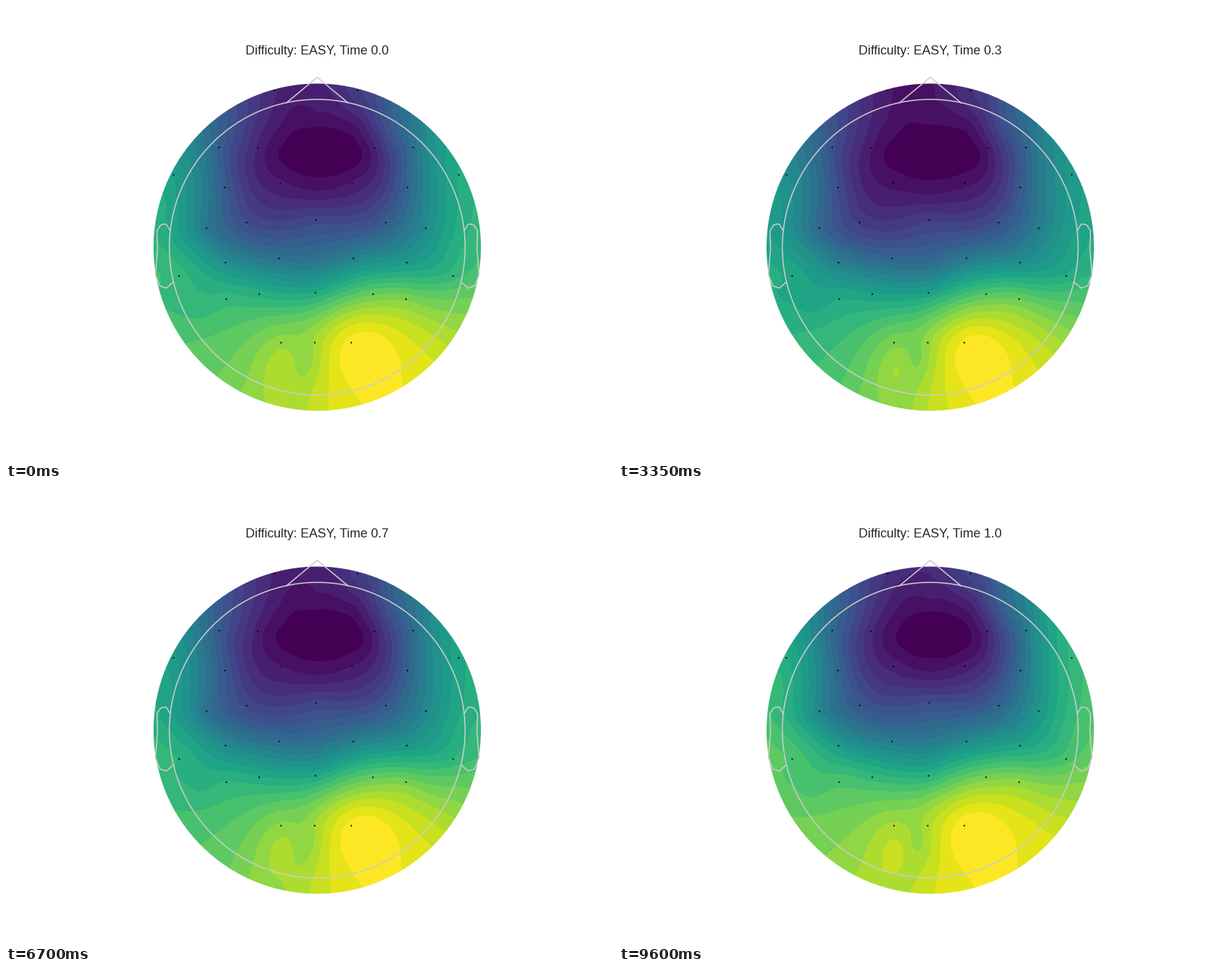
A matplotlib script that plays this animation: 864 by 648 pixels, repeating every 10000 ms.

```python
import numpy as np
import matplotlib.pyplot as plt
from matplotlib.animation import FuncAnimation
from matplotlib.patches import Circle

W, H = 864, 648
FRAMES, STEP = 200, 50
CX, CY, SCALP_R, HEAD_R = 443, 343.5, 233, 210.5
BANDS = 25
MIRROR_X = 440.8

# Left half of the montage, then the midline
LEFT = np.array([
    (382, 120), (303, 201), (358, 202), (238, 240), (311, 258), (390, 252),
    (285, 316), (342, 308), (312, 365), (388, 359), (246, 384), (313, 417),
    (360, 410), (391, 479)])
MIDLINE = np.array([(441, 304), (440, 408), (439, 479)])
SENSORS = np.r_[LEFT, [2 * MIRROR_X, 0] + LEFT * [-1, 1], MIDLINE]

# Key points of the activity map: x, y, level
ANCHORS = np.array([
    (304, 203, .30), (581, 199, .38), (312, 258, .29), (572, 257, .33),
    (284, 316, .41), (441, 304, .22), (595, 316, .47), (313, 365, .49),
    (441, 365, .40), (572, 365, .54), (244, 383, .66), (634, 386, .66),
    (312, 417, .66), (441, 408, .60), (523, 410, .75), (567, 417, .79),
    (270, 440, .67), (390, 479, .82), (439, 479, .845), (425, 505, .81),
    (395, 522, .875), (475, 500, .96), (520, 465, .96), (530, 520, 1.03)])

# Starts of the bursts of activity in ms; each ends in a short rest
BURSTS = np.array([450, 1550, 2750, 4150, 5300, 6200, 7300, 8350, 9450])
LENGTHS = np.diff(BURSTS, append=9650)
ACTIVE = .78


def ellipse(cx, cy, a, b, turn):
    return np.c_[cx + a * np.sin(turn), cy - b * np.cos(turn)]


def edge_level(turn):
    """Level on the scalp edge, clockwise from the nose."""
    even = sum(a * np.cos(k * turn)
               for k, a in enumerate((.614, -.332, -.08, -.067, -.03)))
    odd = sum(b * np.sin(k * turn)
              for k, b in enumerate((.056, -.019, .045), 1))
    return even + odd


def flatten(xy):
    """Unit-disc coordinates, compressed radially towards the edge."""
    p = (xy - (CX, CY)) / SCALP_R
    r = np.maximum(np.hypot(p[:, 0], p[:, 1]), 1e-9)
    return p * (np.sin(1.4 * np.minimum(r, 1.1)) / np.sin(1.4) / r)[:, None]


def kernel(a, b):
    d2 = ((a[:, None] - b[None]) ** 2).sum(-1)
    return .5 * d2 * np.log(d2 + 1e-12)


def thin_plate(points, values, targets):
    n = len(points)
    affine = np.c_[np.ones(n), points]
    system = np.zeros((n + 3, n + 3))
    system[:n, :n] = kernel(points, points) + 1e-4 * np.eye(n)
    system[:n, n:] = affine
    system[n:, :n] = affine.T
    coef = np.linalg.solve(system, np.r_[values, 0, 0, 0])
    return (kernel(targets, points) @ coef[:n]
            + np.c_[np.ones(len(targets)), targets] @ coef[n:])


xs = np.linspace(CX - SCALP_R - 2, CX + SCALP_R + 2, 170)
ys = np.linspace(CY - SCALP_R - 2, CY + SCALP_R + 2, 170)
gx, gy = np.meshgrid(xs, ys)

around = np.radians(np.arange(0, 360, 15))
rings = [(ellipse(CX, CY, SCALP_R, SCALP_R, around), edge_level(around)),
         (ellipse(447, 207.5, 60, 36.5, around[::3]), np.full(8, .04)),
         (ellipse(444, 208, 76, 56, around[::3]), np.full(8, .08)),
         (ANCHORS[:, :2], ANCHORS[:, 2])]
points = np.concatenate([p for p, _ in rings])
levels = np.concatenate([v for _, v in rings])
base = thin_plate(flatten(points), levels,
                  flatten(np.c_[gx.ravel(), gy.ravel()])).reshape(gx.shape)


def away_from(x, y, spread):
    return 1 - np.exp(-((gx - x) ** 2 + (gy - y) ** 2) / (2 * spread ** 2))


# The frontal and occipital poles stay put, the rest drifts
mobility = away_from(447, 207, 90) * away_from(520, 540, 120)


def drift(ms):
    """Slow rise plus a fading dip in the middle of every burst."""
    k = np.searchsorted(BURSTS, ms, side="right") - 1
    if k < 0:
        return 0
    local = min((ms - BURSTS[k]) // 100 * 100, ACTIVE * LENGTHS[k])
    t = (BURSTS[k] + local) / 10000
    dip = min(1, 1.4 * np.sin(np.pi * local / (ACTIVE * LENGTHS[k])))
    fade = max(0, 1 - (t / .9) ** 3)
    return .06 * t ** 2 - .085 * fade * dip


fig = plt.figure(figsize=(W / 72, H / 72), dpi=72, facecolor="white")
ax = fig.add_axes([0, 0, 1, 1])
ax.set(xlim=(0, W), ylim=(H, 0))
ax.axis("off")

scalp = Circle((CX, CY), SCALP_R, transform=ax.transData)
outline = dict(color="#cccccc", lw=1.6, zorder=3)
ax.add_patch(Circle((CX, CY), HEAD_R, fill=False, ec="#cccccc", lw=1.6,
                    zorder=3))
ax.plot([399, CX, 487], [138, 101.5, 138], **outline)
ear_x = np.array([.497, .510, .518, .5299, .5419, .54, .547, .532, .510, .489])
ear_y = np.array([.0555, .0775, .0783, .0746, .0555, -.0055, -.0932, -.1313,
                  -.1384, -.1199])
for side in (-1, 1):
    ax.plot(CX + side * ear_x * 2 * HEAD_R, CY - ear_y * 2 * HEAD_R, **outline)
ax.scatter(*SENSORS.T, s=5, c="black", lw=0, zorder=4)
title = ax.text(CX, 68.7, "", ha="center", va="baseline", color="#262626",
                family="Liberation Sans", size=18.1)

colors = plt.get_cmap("viridis")(np.linspace(0, 1, BANDS))
shown = {"drift": None, "map": None}


def draw(i):
    level = drift(i * STEP)
    if level != shown["drift"]:
        if shown["map"] is not None:
            shown["map"].remove()
        field = np.clip(base + level * mobility, .001, .999)
        shown["map"] = ax.contourf(xs, ys, field,
                                   np.linspace(0, 1, BANDS + 1),
                                   colors=colors, zorder=1)
        shown["map"].set_clip_path(scalp)
        shown["drift"] = level
        ax.set(xlim=(0, W), ylim=(H, 0))
    title.set_text(f"Difficulty: EASY, Time {i / FRAMES:.1f}")
    return []


anim = FuncAnimation(fig, draw, frames=FRAMES, interval=STEP, repeat=True,
                     repeat_delay=0, init_func=lambda: [])
plt.show()
```
